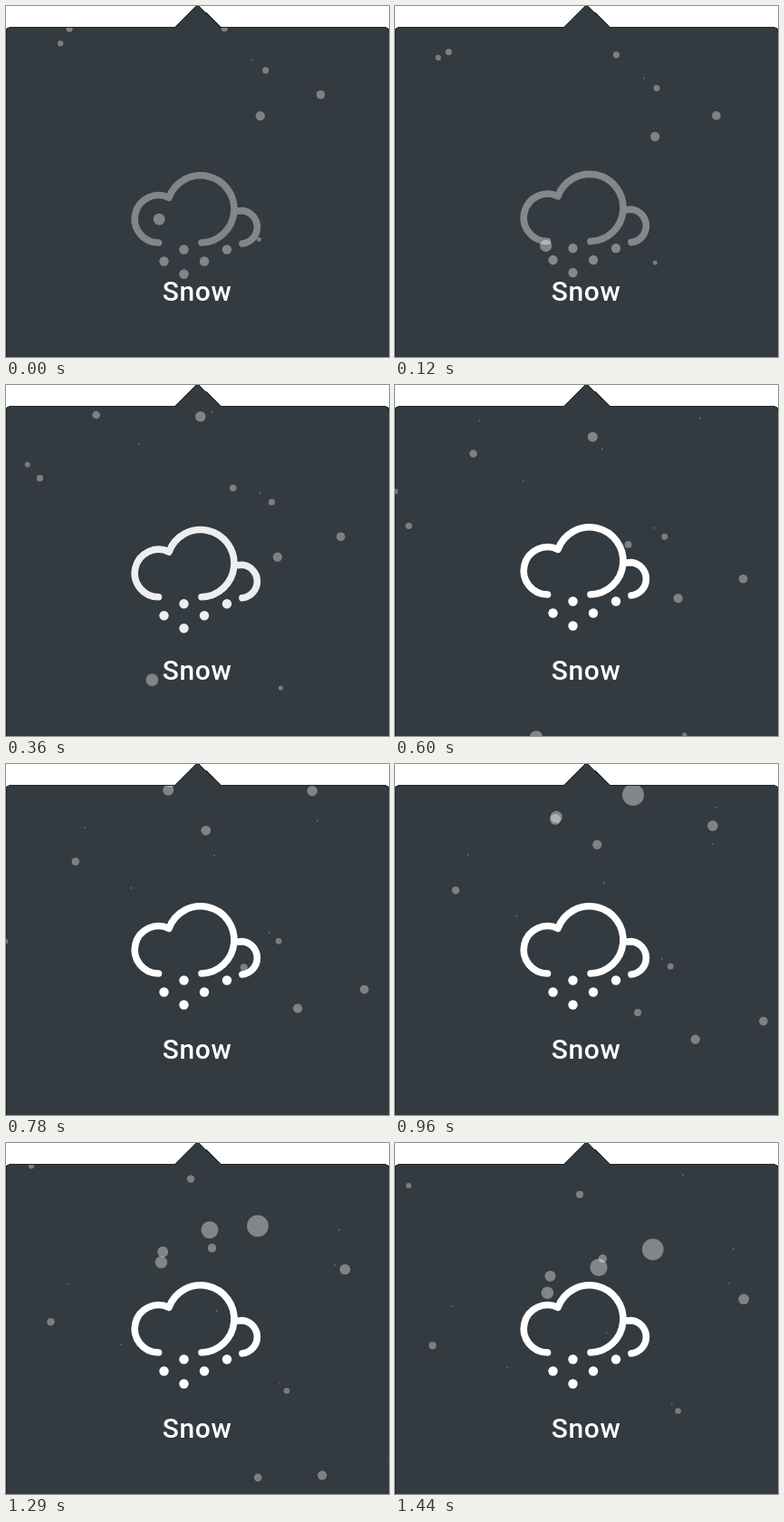
These frames come from a looping animation (423 px wide and 387 px high, 1.47 s). An HTML page with a canvas:

```html
<!DOCTYPE html>
<html lang="en">
<head>
<meta charset="utf-8">
<title>Snow</title>
<style>
  html, body { margin: 0; width: 100%; height: 100%; overflow: hidden; background: #fff; }
  svg, canvas { position: absolute; left: 0; top: 0; display: block; }
  canvas { top: 24px; }
  text { font: 500 30px Roboto, "Open Sans", sans-serif; letter-spacing: .6px; text-anchor: middle; fill: #fff; }
</style>
</head>
<body>
<svg width="423" height="387">
  <path d="M0 388V29Q0 23.5 6 23.5H186.5L209 1Q211.5 -1.5 214 1L237.500 23.500H417Q423 23.500 423 29V388Z"
        fill="#333a40" stroke="#22282d" shape-rendering="crispEdges"/>
</svg>
<canvas id="snow" width="423" height="363"></canvas>
<svg width="423" height="387">
  <g id="icon" fill="#fff">
    <path fill="none" stroke="#fff" stroke-width="7.6" stroke-linecap="round" stroke-linejoin="round"
          d="M168.500 231A26.200 26.200 0 1 1 180 181.300A37.100 37.100 0 1 1 216 231M261 232A18.300 18.300 0 0 0 261 195.600L256 196"/>
    <circle cx="196.500" cy="238.500" r="5.2"/>
    <circle cx="244" cy="238.500" r="5.2"/>
    <circle cx="174.500" cy="251.500" r="5.2"/>
    <circle cx="219" cy="251.500" r="5.2"/>
    <circle cx="196.500" cy="265.500" r="5.2"/>
  </g>
  <text x="211" y="325">Snow</text>
</svg>
<script>
const LOOP = 1470, STEP = 30, TOP = 24, MID = .72;
const ctx = document.getElementById('snow').getContext('2d');
const icon = document.getElementById('icon');

// x, y at mid-loop and velocity in px/s, from the smallest flake to the largest
const paths = [
  [328, 412, 69, 219], [-11, 132, -94, 120], [78, -58, -90, 150],
  [300, 186, 18, 156], [4, 182, -94, 223], [261, 208, 29, 270],
  [80, 97, -54, 177], [204, -29, 0, 125], [392, 237, 62, 194],
  [319, 258, 53, 190], [220, 68, 14, 89], [334, 17, 70, 212],
  [180, 18, -12, 180], [183, 6, -20, 217], [153, 421, -24, 275],
  [225, -55, 0, 255], [252, -8, 46, 176]
];

const flakes = paths.map(([x, y, vx, vy], i) => {
  const size = i / (paths.length - 1);
  return { x, y, vx, vy, r: 2.6 + 4.5 * size + 5 * size ** 14, alpha: .34 + .05 * size };
});

// tiny specks fan out from the middle
let seed = 7;
const random = () => (seed = seed * 16807 % 2147483647) / 2147483647;
for (let i = 0; i < 8; i++) {
  const x = 423 * random(), vy = 140 + 40 * random();
  flakes.push({ x, y: 300 * random() - 100, vx: (x - 211) * .3, vy, r: .9, alpha: .3 });
}

// Fast flakes speed up and grow, slow ones lag and shrink.
function drawFlake({ x, y, vx, vy, r, alpha }, t) {
  const growth = .002 * (vy - 190);
  const s = t + growth * t * t / 2;
  ctx.fillStyle = `rgba(255,255,255,${alpha})`;
  ctx.beginPath();
  ctx.arc(x + vx * s, y + vy * s - TOP, r * (1 + growth * t), 0, 2 * Math.PI);
  ctx.fill();
}

const easeInOut = u => u < .5 ? (2 * u) ** 2.5 / 2 : 1 - (2 - 2 * u) ** 2.5 / 2;

function drawIcon(ms) {
  const p = easeInOut(Math.min(1, Math.max(0, (ms - 35) / 435)));
  icon.setAttribute('transform', `translate(0 ${30 * (1 - p)})`);
  icon.setAttribute('opacity', .39 + .61 * p ** 1.5);
}

function frame() {
  const ms = Math.floor(performance.now() % LOOP / STEP) * STEP;
  ctx.clearRect(0, 0, 423, 363);
  for (const flake of flakes) drawFlake(flake, ms / 1000 - MID);
  drawIcon(ms);
  requestAnimationFrame(frame);
}
frame();
</script>
</body>
</html>
```
